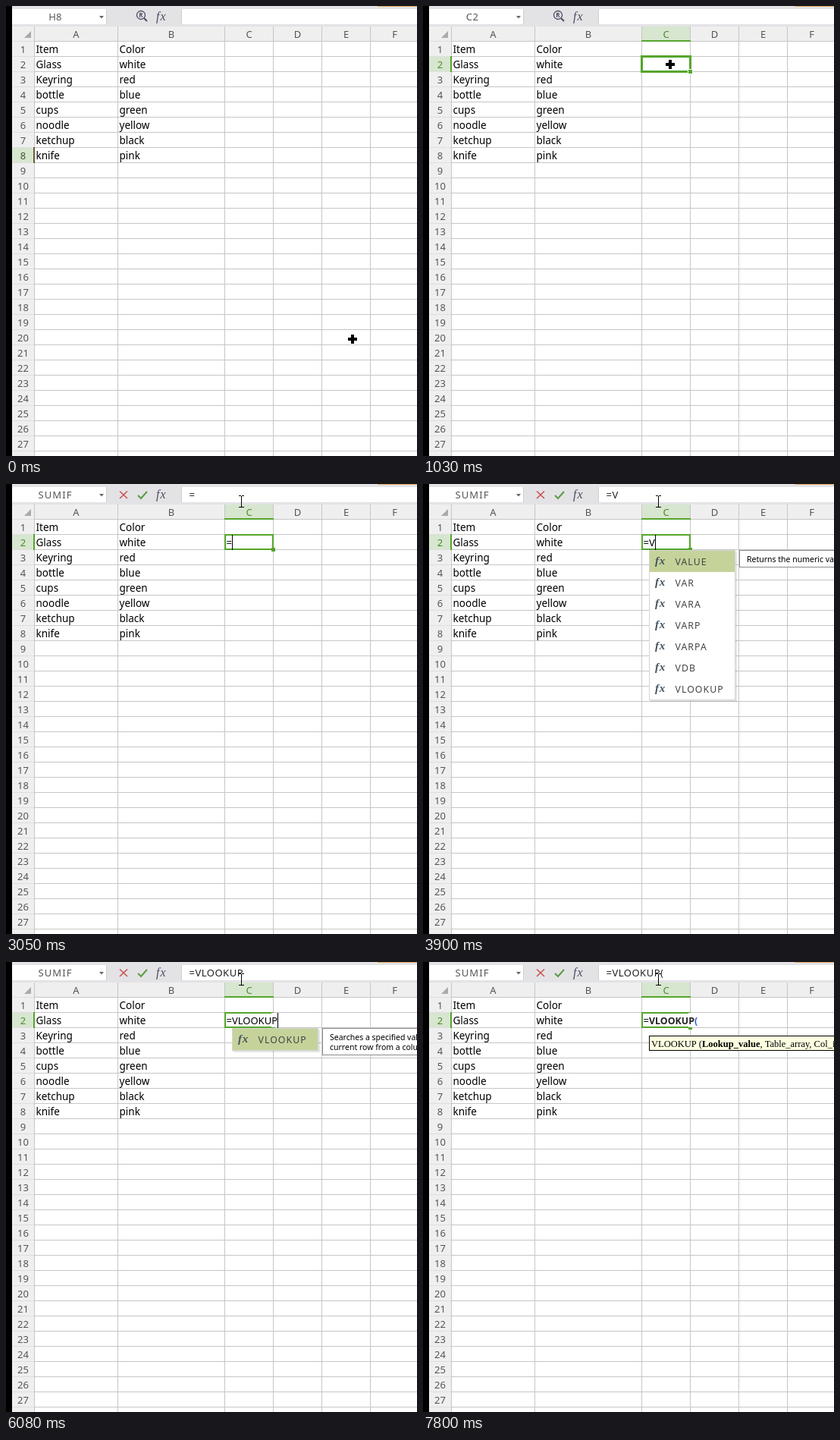
Recreate the animation shown at these times as an HTML page with a canvas. Size 542 by 593 pixels, loop 8 s.

```html
<!DOCTYPE html>
<html lang="en">
<head>
<meta charset="utf-8">
<title>Spreadsheet lookup</title>
<style>
html, body { margin: 0; width: 100%; height: 100%; overflow: hidden; background: #fff; }
canvas { display: block; }
</style>
</head>
<body>
<canvas id="stage" width="542" height="593"></canvas>
<script>
const ctx = document.getElementById('stage').getContext('2d');
const W = 542, H = 593, LOOP = 8000;
const SANS = '"Noto Sans", "Open Sans", sans-serif';
const SERIF = '"Liberation Serif", serif';
const GREEN = '#55a52b', TINT = '#d7e6cf', GRID = '#c6c6c6', HEAD = '#efefef';

const rows = [['Item', 'Color'], ['Glass', 'white'], ['Keyring', 'red'], ['bottle', 'blue'],
  ['cups', 'green'], ['noodle', 'yellow'], ['ketchup', 'black'], ['knife', 'pink']];
const columns = [37, 147, 288, 352, 416, 480, 544];
const functions = ['VALUE', 'VAR', 'VARA', 'VARP', 'VARPA', 'VDB', 'VLOOKUP'];

// [time, value]: each value holds until the next time
const pointer = [[0, [457, 439]], [70, [449, 385]], [140, [421, 215]], [200, [357, 10]], [270, null],
  [420, [320, 10]], [490, [321, 33]], [560, [322, 53]], [640, [324, 65]], [720, [325, 73]], [800, [326, 77]],
  [1350, [330, 71]], [1430, [339, 54]], [1500, [334, 36]], [1580, [317, 24]], [1660, [310, 23]]];
const typing = [[0, ''], [3050, '='], [3840, '=V'], [4130, '=VL'], [4370, '=VLO'], [4430, '=VLOO'],
  [5460, '=VLOOK'], [5850, '=VLOOKU'], [6080, '=VLOOKUP'], [7250, '=VLOOKUP(']];
const caret = [[0, false], [3050, true], [3520, false], [3840, true], [4910, false], [5460, true],
  [6550, false], [7020, true], [7800, false]];
const hint = [[0, 0], [2360, 0.4], [2430, 0.7], [2510, 1], [3050, 0]];

function at(track, t) {
  let value = track[0][1];
  for (const [time, v] of track) if (t >= time) value = v;
  return value;
}

function box(x, y, w, h, color) {
  ctx.fillStyle = color;
  ctx.fillRect(x, y, w, h);
}

function frame(x, y, w, h, color, width = 1) {
  ctx.strokeStyle = color;
  ctx.lineWidth = width;
  ctx.strokeRect(x, y, w, h);
}

function text(str, x, y, { size = 13, color = '#000', align = 'left', style = '', family = SANS, spacing = 0 } = {}) {
  ctx.font = `${style} ${size}px ${family}`;
  ctx.letterSpacing = spacing + 'px';
  ctx.textAlign = align;
  ctx.fillStyle = color;
  ctx.fillText(str, x, y);
  return ctx.measureText(str).width;
}

function line(points, color, width) {
  ctx.strokeStyle = color;
  ctx.lineWidth = width;
  ctx.beginPath();
  points.forEach(([x, y]) => ctx.lineTo(x, y));
  ctx.stroke();
}

function triangle(points, color) {
  ctx.fillStyle = color;
  ctx.beginPath();
  points.forEach(([x, y]) => ctx.lineTo(x, y));
  ctx.fill();
}

function fx(x, y, size, color) {
  text('fx', x, y, { size, color, style: 'italic bold', family: SERIF, spacing: 0.8 });
}

function drawTopBar(name, formula) {
  box(0, 0, W, 27, '#e3e3e6');
  box(490, 0, 52, 1, '#e5a65c');
  box(8, 4, 124, 20, '#fff');
  box(232, 4, 310, 20, '#fff');
  box(132, 4, 1, 20, '#d0d0d4');
  box(231, 4, 1, 20, '#d0d0d4');
  text(name, 65, 19, { color: '#555', align: 'center', spacing: formula ? 1.1 : 0.3 });
  triangle([[123, 13], [129, 13], [126, 16.5]], '#666');
  if (formula) {
    line([[150, 9.5], [160, 19]], '#c8504a', 1.5);
    line([[160, 9.5], [150, 19]], '#c8504a', 1.5);
    line([[174, 15], [178, 19], [186, 10]], '#5c9a45', 2);
  } else {
    ctx.strokeStyle = '#4b4b60';
    ctx.lineWidth = 1.3;
    ctx.beginPath();
    ctx.arc(178, 12, 5.5, 0, Math.PI * 2);
    ctx.stroke();
    line([[182, 16], [186, 20]], '#4b4b60', 2);
    text('R', 178, 15, { size: 8, color: '#4b4b60', align: 'center', style: 'bold' });
  }
  text('fx', 198, 19, { size: 16, color: '#4b4b60', style: 'italic', family: SERIF, spacing: 1 });
  text(formula, 241.5, 19, { size: 13, color: '#222', spacing: 0.5 });
}

function drawSheet(active) {
  box(8, 27, W, 20, HEAD);
  box(8, 47, 29, H, HEAD);
  if (active) box(289, 27, 63, 19, TINT);
  const activeRow = active ? 2 : 8;
  box(8, 27 + activeRow * 20, 29, 19, TINT);

  for (let y = 46; y < H; y += 20) {
    box(8, y, 29, 1, '#dedede');
    box(37, y, W, 1, GRID);
  }
  columns.forEach(x => box(x, 27, 1, H, GRID));
  triangle([[33, 33], [33, 42], [24, 42]], '#aaa');

  [...'ABCDEF'].forEach((letter, i) => {
    const on = active && letter === 'C';
    text(letter, (columns[i] + columns[i + 1]) / 2 + 0.5, 42, { color: on ? '#4c8a2c' : '#555', align: 'center' });
  });
  for (let r = 1; r <= 27; r++) {
    const color = r !== activeRow ? '#555' : active ? '#4c8a2c' : '#3c542f';
    text(r, 22.5, 42 + r * 20, { color, align: 'center' });
  }
  rows.forEach((cells, r) => cells.forEach((cell, c) =>
    text(cell, columns[c] + 2.5, 62 + r * 20, { size: 13.5 })));

  box(36, 26 + activeRow * 20, 2, 21, active ? GREEN : '#75583c');
  if (active) box(288, 45, 65, 2, GREEN);
}

function drawCell(formula, caretOn) {
  if (!formula) {
    frame(288.5, 66.5, 64, 20, GREEN, 3);
    box(349, 83, 7, 7, '#fff');
    box(350, 84, 5, 5, GREEN);
    return;
  }
  box(289, 67, 63, 19, '#fff');
  frame(289, 67, 63, 19, GREEN, 2);
  box(350, 84, 5, 5, GREEN);
  ctx.font = `13px ${SANS}`;
  ctx.letterSpacing = '0px';
  const end = Math.round(290.5 + ctx.measureText(formula).width);
  if (end > 350) box(350, 67, end - 350, 19, '#fff');
  if (formula.endsWith('(')) {
    text('=', 290.5, 82);
    const width = text('VLOOKUP', 298, 82, { size: 12.4, color: '#222', style: 'bold' });
    text('(', 298 + width, 82, { size: 12.4, color: '#2f62d0', style: 'bold' });
  } else {
    text(formula, 290.5, 82);
  }
  if (caretOn) box(end, 67, 1, 20, '#000');
}

function drawSuggestions(items, description) {
  const height = items.length * 28 + 1;
  box(300, 89, 114, height + 1, 'rgba(0,0,0,.10)');
  box(298, 87, 114, height, '#fff');
  frame(298.5, 87.5, 113, height, '#d4d4d4');
  box(299, 88, 112, 28, '#c5d39b');
  items.forEach((item, i) => {
    fx(306, 106 + i * 28, 15, '#44525e');
    text(item, 332.5, 107 + i * 28, { size: 12.3, color: '#444', spacing: 1.05 });
  });
  if (!description) return;
  box(417, 87, 130, description.length * 13 + 10, '#fff');
  frame(417.5, 87.5, 130, description.length * 13 + 9, '#8c8c8c');
  description.forEach((str, i) => text(str, 427, 103 + i * 13, { size: 10.5 }));
}

function drawArguments() {
  box(298, 97, 250, 20, '#ffffe1');
  frame(298.5, 97.5, 250, 19, '#000');
  let x = 301;
  [['VLOOKUP (', ''], ['Lookup_value', 'bold'], [', Table_array, Col_index_num', '']].forEach(([str, style]) => {
    x += text(str, x, 112, { size: 12.5, style, family: SERIF });
  });
}

function drawHint(level) {
  ctx.globalAlpha = 0.4 + level * 0.6;
  box(313, 46, 80, 23, 'rgba(0,0,0,.35)');
  box(309, 42, 82, 25, '#fff');
  frame(309.5, 42.5, 81, 24, '#9a9a9a');
  ctx.globalAlpha = level;
  text('Formula Bar', 317, 58, { size: 11, color: '#575757' });
  ctx.globalAlpha = 1;
}

function drawPointer([x, y]) {
  if (y < 27) {
    box(x, y - 7, 1, 15, '#000');
    for (const edge of [y - 8, y + 7]) {
      box(x - 3, edge, 3, 1, '#000');
      box(x + 1, edge, 3, 1, '#000');
    }
  } else if (y < 47) {
    box(x - 1, y - 6, 3, 7, '#000');
    triangle([[x - 4, y], [x + 5, y], [x + 0.5, y + 6]], '#000');
  } else {
    box(x - 7, y - 3, 14, 6, '#fff');
    box(x - 3, y - 7, 6, 14, '#fff');
    box(x - 6, y - 2, 12, 4, '#000');
    box(x - 2, y - 6, 4, 12, '#000');
  }
}

function render(t) {
  const active = t >= 1030;
  const formula = at(typing, t);
  box(0, 0, W, H, '#fff');
  drawSheet(active);
  drawTopBar(formula ? 'SUMIF' : active ? 'C2' : 'H8', t >= 7250 && t < 7340 ? '=VLOOKUP' : formula);
  box(0, 0, 8, H, '#000');
  if (active) drawCell(formula, at(caret, t));

  if (t >= 7340) drawArguments();
  else if (t >= 4130) drawSuggestions(['VLOOKUP'], ['Searches a specified value in the', 'current row from a column']);
  else if (t >= 3840) drawSuggestions(functions, t >= 3900 && ['Returns the numeric value']);

  const level = at(hint, t);
  if (level) drawHint(level);
  const position = at(pointer, t);
  if (position) drawPointer(position);
}

const start = performance.now();
function tick() {
  render((performance.now() - start) % LOOP);
  requestAnimationFrame(tick);
}
tick();
</script>
</body>
</html>
```
